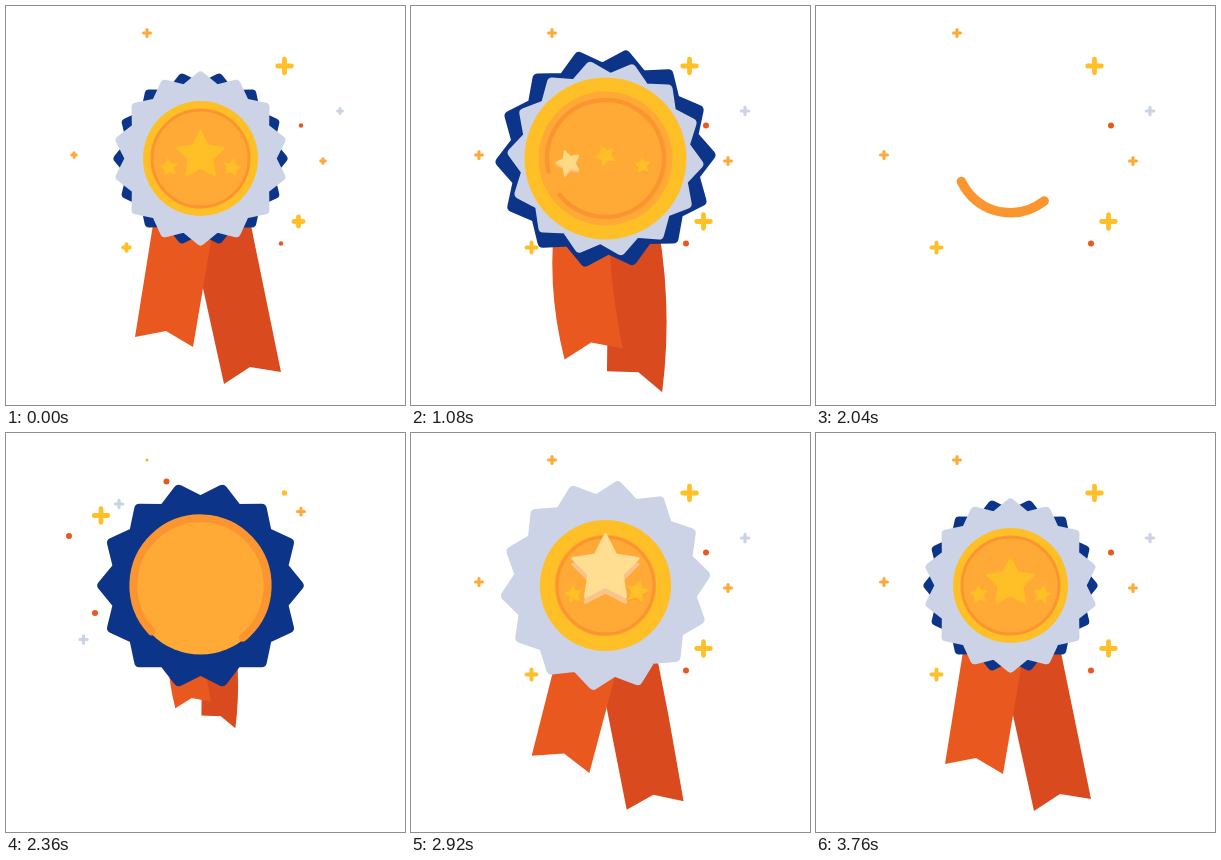
An HTML page with a canvas for the animation above (3800 ms loop, 399 by 399 pixels).

```html
<!DOCTYPE html>
<html lang="en">
<head>
<meta charset="utf-8">
<title>Award badge</title>
<style>
html, body { margin: 0; width: 100%; height: 100%; overflow: hidden; background: #fff; }
canvas { display: block; width: 100vw; height: 100vh; }
</style>
</head>
<body>
<canvas id="stage" width="399" height="399"></canvas>
<script>
const ctx = document.getElementById('stage').getContext('2d');
const LOOP = 3800, STEP = 40, MIDDLE = 1820, TWINKLE = 900, RAMP = 100;
const CX = 194.5, CY = 152.5, TEETH = 14, RAD = Math.PI / 180;
const NAVY = '#0c3488', LILAC = '#ccd3e6', YELLOW = '#ffbf27', ORANGE = '#ffa936',
  AMBER = '#fb9530', RED = '#e9581f', BRICK = '#d94a1e';

const clamp = v => Math.min(1, Math.max(0, v));
const lerp = (a, b, k) => a + (b - a) * k;

// Smooth step from 0 to 1 between two times
function ease(u, from, to) {
  const k = clamp((u - from) / (to - from));
  return k * k * (3 - 2 * k);
}

// Rounded pulse that peaks at one time
function bump(u, at, width) {
  const k = (u - at) / width;
  return Math.abs(k) < 1 ? Math.cos(k * Math.PI / 2) ** 2 : 0;
}

// Grows from nothing, swells past its resting size and settles
function pop(u, start, rest, swell, at, width = 600) {
  return ease(u, start, start + 240) * (rest + swell * bump(u, at, width));
}

function disc(x, y, r, color) {
  ctx.fillStyle = color;
  ctx.beginPath();
  ctx.arc(x, y, r, 0, 7);
  ctx.fill();
}

// Closed radial shape alternating between two radii
function spikes(x, y, count, outer, inner, deg, color, round) {
  ctx.fillStyle = ctx.strokeStyle = color;
  ctx.lineJoin = 'round';
  ctx.lineWidth = round;
  ctx.beginPath();
  for (let i = 0; i < count * 2; i++) {
    const a = deg * RAD + i * Math.PI / count, r = i % 2 ? inner : outer;
    ctx.lineTo(x + r * Math.cos(a), y + r * Math.sin(a));
  }
  ctx.closePath();
  ctx.fill();
  ctx.stroke();
}

function rosette(r, deg, color) {
  if (r > 1) spikes(CX, CY, TEETH, r * .95, r * .82, deg, color, r * .1);
}

// Sparkles come in groups that share one time window
const GOLD = { size: 18.5, color: YELLOW }, WARM = { size: 10, color: ORANGE },
  COOL = { size: 10.5, color: LILAC }, DOT = { size: 6, color: RED, round: true };
const SPARKS = [
  { from: -100, to: 590, marks: [[141, 27, WARM], [278.5, 60, GOLD]] },
  { from: -75, to: 440, marks: [
    [334, 105, COOL], [68, 149, WARM], [317, 155, WARM], [292.5, 215.5, GOLD],
    [120.5, 241.5, { size: 14, color: YELLOW }], [295, 119.5, DOT], [275, 237.5, DOT]] },
  { from: 400, to: 740, marks: [
    [113, 71, COOL], [160.5, 48.5, DOT], [89, 180, DOT], [63, 103, DOT]] },
  { from: 410, to: 895, marks: [[95, 82.5, GOLD], [295, 78.5, WARM], [77.5, 206.5, COOL]] },
  { from: 630, to: 900, marks: [
    [198, 36, COOL], [284, 254.5, COOL], [103, 254, WARM], [317, 155, WARM],
    [120.5, 241.5, GOLD], [292.5, 215.5, GOLD],
    [245.5, 31, DOT], [334, 181, DOT], [101, 270.5, DOT]] }
];

function cross(x, y, size, width, color) {
  const w = Math.min(size, width), arm = Math.max((size - w) / 2, .01);
  ctx.strokeStyle = color;
  ctx.lineCap = 'round';
  ctx.lineWidth = w;
  ctx.beginPath();
  ctx.moveTo(x - arm, y);
  ctx.lineTo(x + arm, y);
  ctx.moveTo(x, y - arm);
  ctx.lineTo(x, y + arm);
  ctx.stroke();
}

function drawSparkles(t) {
  for (const { from, to, marks } of SPARKS) {
    const age = (t - from + TWINKLE) % TWINKLE;
    const k = clamp(Math.min(age, to - from - age) / RAMP);
    if (!k) continue;
    for (const [x, y, { size, color, round }] of marks) {
      if (round) disc(x, y, size * k / 2, color);
      else cross(x, y, size * k, size * .2 + 1.1, color);
    }
  }
}

// Ribbon corners: top left, top right, lower right, notch, lower left
const LEFT = {
  hang: [[145, 200], [198, 200], [212, 344], [180, 338], [153, 355]],
  rest: [[150, 200], [211, 200], [187, 341], [160, 325], [129, 331]]
};
const RIGHT = {
  hang: [[198, 200], [244, 200], [252, 388], [228, 368], [196, 367]],
  rest: [[179, 200], [241, 200], [275, 366], [244, 361], [218, 378]]
};

// side is -1 or 1: the outer edge that bows while the ribbon hangs
function ribbon({ hang, rest }, swing, side, color) {
  const [a, b, c, notch, d] = hang.map((p, i) => p.map((v, j) => lerp(v, rest[i][j], swing)));
  const bow = 16 * clamp(1 - swing);
  const edge = (p, q, out) =>
    ctx.quadraticCurveTo((p[0] + q[0]) / 2 + out, (p[1] + q[1]) / 2, q[0], q[1]);
  ctx.fillStyle = color;
  ctx.beginPath();
  ctx.moveTo(...a);
  ctx.lineTo(...b);
  edge(b, c, side > 0 ? bow : -bow / 2);
  ctx.lineTo(...notch);
  ctx.lineTo(...d);
  edge(d, a, side < 0 ? -bow : 0);
  ctx.fill();
}

function drawRibbons(u) {
  const drop = ease(u, 220, 780), swing = ease(u, 780, 1180);
  if (!drop) return;
  ctx.save();
  ctx.translate(CX, CY);
  ctx.scale(drop, drop + .07 * bump(u, 900, 200));
  ctx.translate(-CX, -CY);
  ribbon(RIGHT, swing, 1, BRICK);
  ribbon(LEFT, swing + .45 * bump(u, 1100, 320), -1, RED);
  ctx.restore();
}

function drawRing(u) {
  const k = clamp((u - 80) / 900), sweep = 360 * (1 - (1 - k) ** 2);
  if (!sweep) return;
  ctx.strokeStyle = AMBER;
  ctx.lineCap = 'round';
  ctx.lineWidth = 3 + 7 * bump(u, 320, 600);
  ctx.beginPath();
  ctx.arc(CX, CY, pop(u, 35, 48.5, 20, 440), sweep / 2 * RAD, sweep * 1.5 * RAD);
  ctx.stroke();
}

function mix(a, b, k) {
  return `rgb(${a.map((v, i) => Math.round(lerp(v, b[i], k))).join(',')})`;
}

// The stars flash one after another: left, right, centre
const STARS = [
  { dx: -31.5, y: 161.5, size: 9.5, lean: -8 },
  { dx: 31.5, y: 161.5, size: 9.5, lean: 12 },
  { dx: 0, y: 149.5, size: 25.5, lean: 0 }
];

function drawStars(u, spread) {
  STARS.forEach(({ dx, y, size, lean }, i) => {
    const start = 500 + 65 * i, at = 780 + 160 * i;
    const r = pop(u, start, size, size * .4, at, 350);
    if (r < .5) return;
    const lift = bump(u, at, 350), pale = bump(u, at, 180);
    const deg = lean - 90 - 30 * (1 - ease(u, start, start + 400));
    const shape = (drop, color) => spikes(CX + dx * spread, y + size * (drop - .53 * lift),
      5, r * .96, r * .49, deg, color, r * .08);
    if (lift) shape(.23 * lift, mix([247, 160, 42], [248, 196, 138], pale));
    shape(0, mix([255, 191, 39], [255, 222, 146], pale));
  });
}

// The second half of the loop plays the badge forward, the first half backward
function draw(t) {
  const u = Math.abs(t - MIDDLE), core = pop(u, 220, 49.5, 20, 600);
  ctx.fillStyle = '#fff';
  ctx.fillRect(0, 0, 399, 399);
  drawRibbons(u);
  rosette(pop(u, 274, 87, 23, 760), -77.1 - 5.3 * bump(u, 1100, 600), NAVY);
  rosette(pop(u, 400, 87, 19, 1010), -72 - 18 * ease(u, 560, 1500), LILAC);
  disc(CX, CY, pop(u, 400, 57.5, 23.5, 740), YELLOW);
  disc(CX, CY, core, ORANGE);
  drawRing(u);
  drawStars(u, (1 + core / 49.5) / 2);
  drawSparkles(t);
}

const start = performance.now();
function tick() {
  const t = (performance.now() - start) % LOOP;
  draw(Math.floor(t / STEP) * STEP);
  requestAnimationFrame(tick);
}
tick();
</script>
</body>
</html>
```
